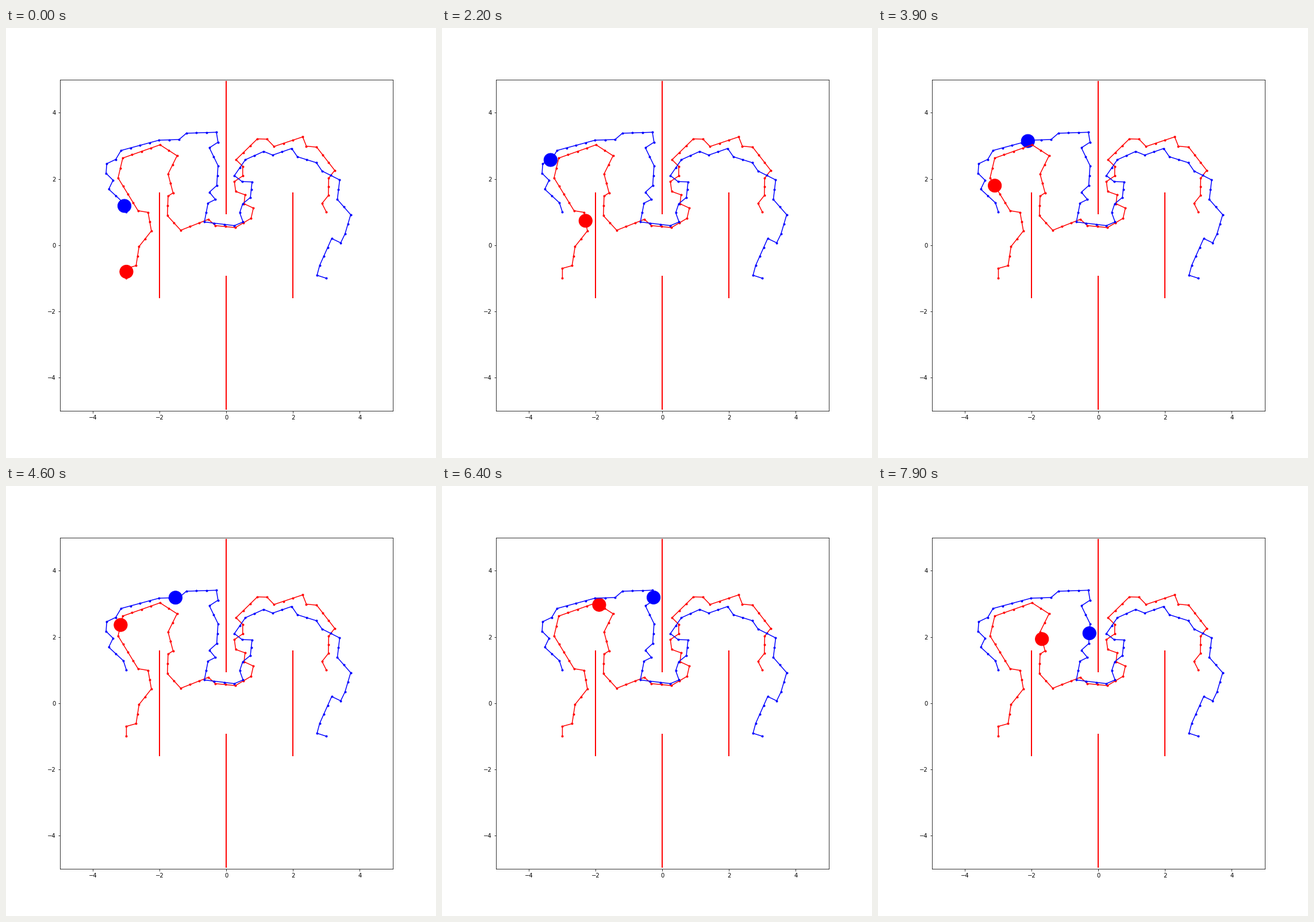
These frames come from a looping animation (748x748 px, 8000 ms). A matplotlib script:

```python
import numpy as np
import matplotlib.pyplot as plt
from matplotlib.animation import FuncAnimation
from matplotlib.patches import Circle

SIZE, DPI = 748, 72
FRAMES = 80
STEP = .3     # spacing of the planned waypoints
START = .66   # progress at the first frame, in waypoints

# Turning points; the waypoints between them follow by rule.
RED = [(-3, -1), (-3, -.7), (-2.71, -.62), (-2.62, -.04), (-2.25, .43),
       (-2.35, .99), (-2.65, 1.04), (-3.25, 2.03), (-3.11, 2.63),
       (-1.99, 3.03), (-1.48, 2.7), (-1.75, 2.15), (-1.6, 1.58),
       (-1.75, 1.48), (-1.77, .89), (-1.37, .45), (-.54, .78), (-.33, .59),
       (.27, .53), (.74, .81), (.81, 1.12), (.53, 1.25), (.56, 1.52),
       (.28, 1.62), (.24, 1.92), (.49, 2.09), (.49, 2.38), (.29, 2.58),
       (.93, 3.21), (1.22, 3.2), (1.43, 2.98), (2.29, 3.27), (2.4, 2.99),
       (2.71, 2.96), (3.25, 2.26), (3.07, 2.02), (3.06, 1.5), (2.87, 1.26),
       (3, 1)]
BLUE = [(-3, 1), (-3.09, 1.28), (-3.53, 1.69), (-3.4, 1.96), (-3.61, 2.17),
        (-3.59, 2.46), (-3.32, 2.59), (-3.16, 2.86), (-2.02, 3.17),
        (-1.42, 3.19), (-1.2, 3.38), (-.3, 3.41), (-.25, 3.11), (-.51, 2.94),
        (-.25, 2.4), (-.29, 1.8), (-.51, 1.6), (-.33, 1.38), (-.55, 1.27),
        (-.66, .7), (.24, .59), (.5, .7), (.4, .98), (.49, 1.25), (.72, 1.44),
        (.77, 1.91), (.47, 1.92), (.24, 2.1), (.57, 2.58), (1.12, 2.83),
        (1.39, 2.72), (1.96, 2.92), (2.13, 2.67), (2.7, 2.49), (2.87, 2.24),
        (3.4, 1.97), (3.33, 1.38), (3.73, .92), (3.56, .34), (3.43, .07),
        (3.16, .2), (2.8, -.61), (2.72, -.91), (3, -1)]


def waypoints(corners):
    """Split every straight run into equal steps of about STEP."""
    corners = np.array(corners, float)
    path = [corners[0]]
    for a, b in zip(corners, corners[1:]):
        n = max(1, round(np.hypot(*(b - a)) / STEP))
        path += [a + (b - a) * k / n for k in range(1, n + 1)]
    return np.array(path)


def along(path, progress):
    """Point on the path, with progress counted in waypoints."""
    idx = np.arange(len(path))
    return [np.interp(progress, idx, axis) for axis in path.T]


# The small margin keeps the pixel size from rounding down.
side = (SIZE + .01) / DPI
fig, ax = plt.subplots(figsize=(side, side), dpi=DPI)
fig.subplots_adjust(left=.125, right=.9, bottom=.11, top=.88)
ax.set(xlim=(-5, 5), ylim=(-5, 5),
       xticks=range(-4, 5, 2), yticks=range(-4, 5, 2))

for x, low, high in [(-2, -1.58, 1.58), (2, -1.58, 1.58),
                     (0, .95, 4.95), (0, -4.95, -.95)]:
    ax.plot([x, x], [low, high], color="red", lw=2)

agents = []
for color, corners, speed in [("red", RED, .2923), ("blue", BLUE, .2823)]:
    path = waypoints(corners)
    ax.plot(*path.T, ".-", color=color, lw=1.5)
    disc = ax.add_patch(Circle(along(path, START), .2, color=color))
    agents.append((disc, path, speed))


def update(i):
    for disc, path, speed in agents:
        disc.center = along(path, START + speed * i)
    return [agent[0] for agent in agents]


anim = FuncAnimation(fig, update, frames=FRAMES, interval=100,
                     repeat=True, repeat_delay=0, blit=False)
plt.show()
```
